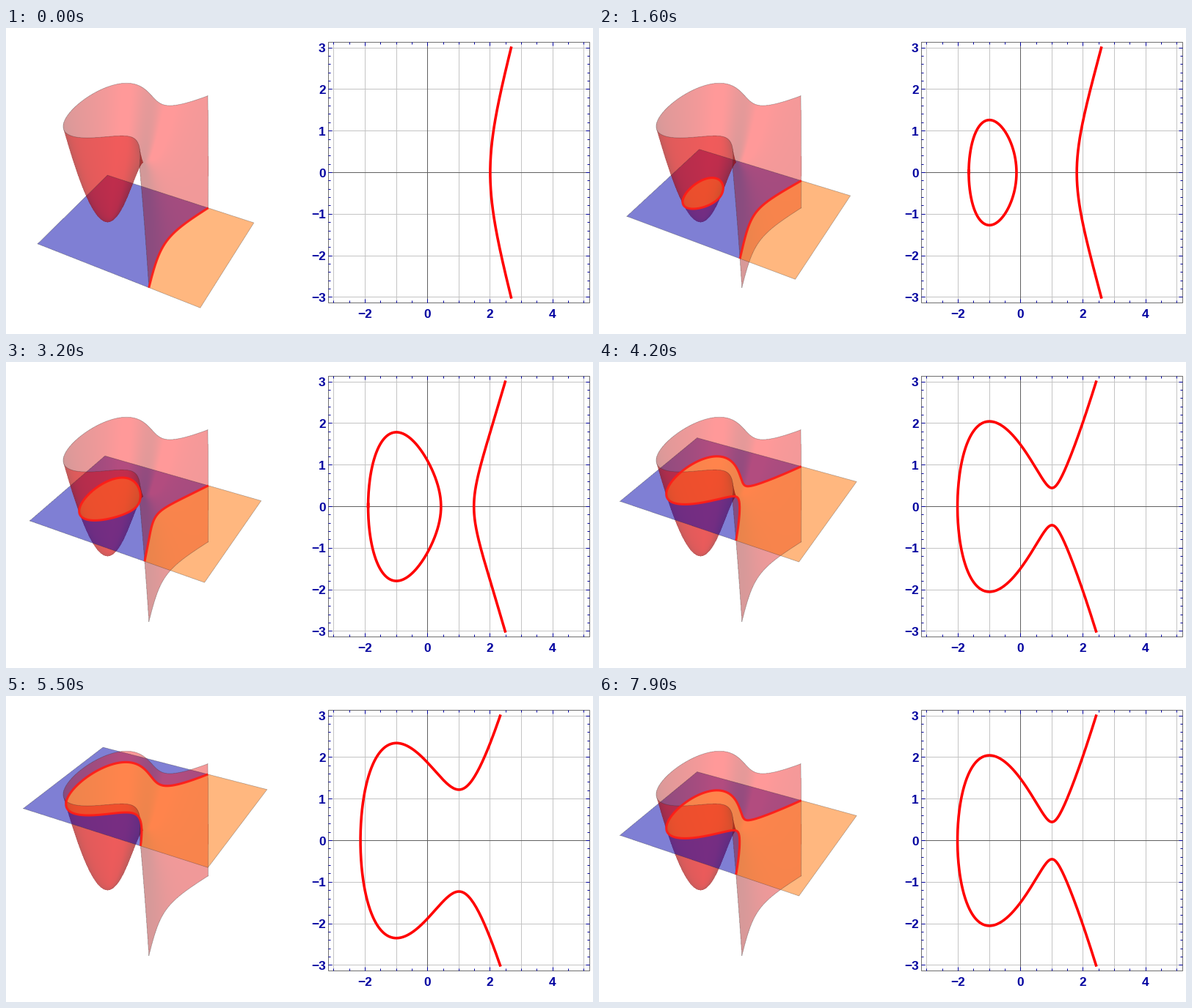
Write a matplotlib script that moves like this. It is 800 px wide and 418 px high and loops after 8000 ms.

```python
import numpy as np
import matplotlib.pyplot as plt
from matplotlib.animation import FuncAnimation
from matplotlib.collections import LineCollection

W, H, DPI = 800, 418, 64
PT = 72 / DPI                      # points per pixel
FRAMES, STEP = 80, 100
RED, NAVY = "#ff0000", "#0000a0"

# ---------- camera (data units) ----------
VIEW = np.array([1.3, -2.4, 2.0])
DIST = 8 * np.linalg.norm(VIEW)
FWD = VIEW / np.linalg.norm(VIEW)
RIGHT = np.cross([0, 0, 1], FWD)
RIGHT /= np.linalg.norm(RIGHT)
UP = np.cross(FWD, RIGHT)
MID = np.array([1.0, 0.0, 1.0])
FOCAL, CX, CY = 859, 193.5, 208.1


def project(x, y, z):
    p = np.stack(np.broadcast_arrays(x, y, z), -1) - MID
    k = FOCAL / (DIST - p @ FWD)
    return CX + k * (p @ RIGHT), CY - k * (p @ UP)


# ---------- the curves y^2 = x^3 - 3x + c ----------
def big_root(c):
    """Outermost real root of x^3 - 3x + c when |c| >= 2."""
    return -np.sign(c) * 2 * np.cosh(np.arccosh(np.abs(c) / 2) / 3)


def height(x, c):
    return np.sqrt(np.maximum(x**3 - 3 * x + c, 0))


def curve(c):
    """Both branches as one polyline, split by NaN."""
    end = big_root(c - 9)
    if abs(c) < 2 - 1e-9:
        angle = np.arccos(-c / 2)
        start, hi, lo = 2 * np.cos((angle - 2 * np.pi * np.arange(3)) / 3)
    else:
        start, lo, hi = big_root(c), None, None
    s = np.linspace(-1, 1, 401)
    x = start + (end - start) * s**2
    y = np.sign(s) * height(x, c)
    if lo is not None:
        a = np.linspace(0, 2 * np.pi, 241)
        ox = (lo + hi) / 2 - (hi - lo) / 2 * np.cos(a)
        oy = np.sign(np.sin(a)) * height(ox, c)
        x = np.r_[x, np.nan, ox, ox[1]]
        y = np.r_[y, np.nan, oy, oy[1]]
    return x, y


def level(i):
    return (i - 20) / 10 if i <= 60 else (101 - i) / 10


# ---------- ray casting of z = y^2 - x^3 + 3x ----------
X0, X1, Y0, Y1, SS = 18, 362, 56, 388, 2
gx = np.arange(X0 * SS, X1 * SS) / SS + 0.5 / SS
gy = np.arange(Y0 * SS, Y1 * SS) / SS + 0.5 / SS
u, v = np.meshgrid((gx - CX) / FOCAL, (CY - gy) / FOCAL)
side = u[..., None] * RIGHT + v[..., None] * UP
ray = side - FWD
base = MID + DIST * side
bx, by, bz = np.moveaxis(base, -1, 0)
dx, dy, dz = np.moveaxis(ray, -1, 0)


def cast():
    """Depths of up to three hits per ray, farthest first."""
    k3 = -dx**3
    b = (dy**2 - 3 * bx * dx**2) / k3
    c = (2 * by * dy - 3 * bx**2 * dx + 3 * dx - dz) / k3
    d = (by**2 - bx**3 + 3 * bx - bz) / k3
    p = c - b**2 / 3
    q = 2 * b**3 / 27 - b * c / 3 + d
    disc = q**2 / 4 + p**3 / 27
    three = disc < 0
    root = np.sqrt(np.maximum(disc, 0))
    single = np.cbrt(-q / 2 + root) + np.cbrt(-q / 2 - root)
    m = np.sqrt(np.where(three, -p / 3, 1))
    ang = np.arccos(np.clip(-q / (2 * m**3), -1, 1))
    for k in range(3):
        t = 2 * m * np.cos((ang - 2 * np.pi * k) / 3)
        yield np.where(three, t, single if k == 0 else np.nan) - b / 3


def shade(x, y):
    """Two-sided light from the camera."""
    n = np.stack([3 - 3 * x**2, 2 * y, -np.ones_like(x)], -1)
    facing = np.abs(n @ FWD) / np.linalg.norm(n, axis=-1)
    return np.minimum(0.52 + 0.55 * facing, 1)


layers = []
for t in cast():
    x, y, z = bx + t * dx, by + t * dy, bz + t * dz
    ok = (np.abs(y) <= 3) & (z >= -2) & (z <= 4) & (x >= -3) & (x <= 5)
    x, y = np.where(ok, x, 0), np.where(ok, y, 0)
    rgb = np.zeros(x.shape + (3,), np.float32)
    rgb[..., 0] = shade(x, y)
    layers.append((np.where(ok, t, np.nan), rgb))

BLUE = np.array([0, 0, 170], np.float32) / 255
ORANGE = np.array([255, 112, 0], np.float32) / 255


def blend(img, rgb, mask, alpha):
    img += (mask * np.float32(alpha))[..., None] * (rgb - img)


def render(c):
    tp = (c - bz) / dz
    x, y = bx + tp * dx, by + tp * dy
    inside = (np.abs(y) <= 3) & (x >= -3) & (x <= 5)
    outer = y**2 - x**3 + 3 * x > c
    img = np.ones(x.shape + (3,), np.float32)
    for t, rgb in layers:
        blend(img, rgb, t >= tp, 0.4)
    blend(img, np.where(outer[..., None], BLUE, ORANGE), inside, 0.5)
    for t, rgb in layers:
        blend(img, rgb, t < tp, 0.4)
    h, w = Y1 - Y0, X1 - X0
    return np.clip(img.reshape(h, SS, w, SS, 3).mean((1, 3)), 0, 1)


# ---------- stage in pixel coordinates ----------
fig = plt.figure(figsize=(W / DPI, H / DPI), dpi=DPI, facecolor="white")
ax = fig.add_axes([0, 0, 1, 1])
ax.axis("off")
picture = ax.imshow(render(level(0)), extent=(X0, X1, Y1, Y0),
                    interpolation="nearest", aspect="auto", zorder=0)
ax.set(xlim=(0, W), ylim=(H, 0))


def stroke(x, y, color, width, **kw):
    return ax.plot(x, y, color=color, lw=width * PT, **kw)[0]


EDGE = dict(color="#303030", width=0.75, alpha=0.36, zorder=1, snap=False)
for zc in (-2, 4):
    stroke(*project(*curve(zc), zc), **EDGE)
zs = np.linspace(-2, 4, 60)
for ye in (-3, 3):
    stroke(*project(big_root(zs - 9), ye, zs), **EDGE)
sheet_edge = stroke([], [], **EDGE)
cut = stroke([], [], "#ff1c16", 3.1, zorder=2, alpha=0.92,
             solid_capstyle="butt", solid_joinstyle="round")

# ---------- flat plot ----------
L, R, T, B = 439.5, 795.5, 19.5, 375.5


def px(x):
    return 574.7 + 42.6 * x


def py(y):
    return 197.5 - 56.8 * y


def mid(v):
    """Centre of the pixel that holds v."""
    return np.floor(v) + 0.5


def segments(lines, color, z):
    ax.add_collection(LineCollection(lines, colors=color, linewidths=PT,
                                     zorder=z, snap=False), autolim=False)


def column(i):
    return [(mid(px(i)), T), (mid(px(i)), B)]


def row(j):
    return [(L, mid(py(j))), (R, mid(py(j)))]


segments([column(i) for i in range(-3, 6) if i]
         + [row(j) for j in range(-3, 4) if j], "#c4c4c4", 3)
segments([column(0), row(0)], "#606060", 3.1)
segments([[(L, T), (R, T), (R, B), (L, B), (L, T)]], "#707070", 3.2)

ticks = []
for i in range(-6, 11):
    n, x = (5 if i % 4 == 0 else 3), mid(px(i / 2))
    ticks += [[(x, T), (x, T + n)], [(x, B), (x, B - n)]]
for j in range(-15, 16):
    n, y = (5 if j % 5 == 0 else 3), mid(py(j / 5))
    ticks += [[(L, y), (L + n, y)], [(R, y), (R - n, y)]]
segments(ticks, NAVY, 3.3)


def label(x, y, value, ha):
    ax.text(x, y, str(value).replace("-", "\u2212"), ha=ha, va="center_baseline",
            color=NAVY, family="Liberation Sans", weight="bold", size=17.3 * PT)


for i in (-2, 0, 2, 4):
    label(px(i) - 0.5, 390.3, i, "center")
for j in range(-3, 4):
    label(435.6, py(j), j, "right")

flat = stroke([], [], RED, 3.6, zorder=5,
              solid_capstyle="projecting", solid_joinstyle="round")

SHEET_X = np.array([-3, 5, 5, -3, -3])
SHEET_Y = np.array([-3, -3, 3, 3, -3])


def update(i):
    c = level(i)
    x, y = curve(c)
    picture.set_data(render(c))
    sheet_edge.set_data(*project(SHEET_X, SHEET_Y, c))
    cut.set_data(*project(x, y, c))
    flat.set_data(px(x), py(y))
    return picture, sheet_edge, cut, flat


anim = FuncAnimation(fig, update, frames=FRAMES, interval=STEP,
                     repeat=True, repeat_delay=0, blit=False)
plt.show()
```
